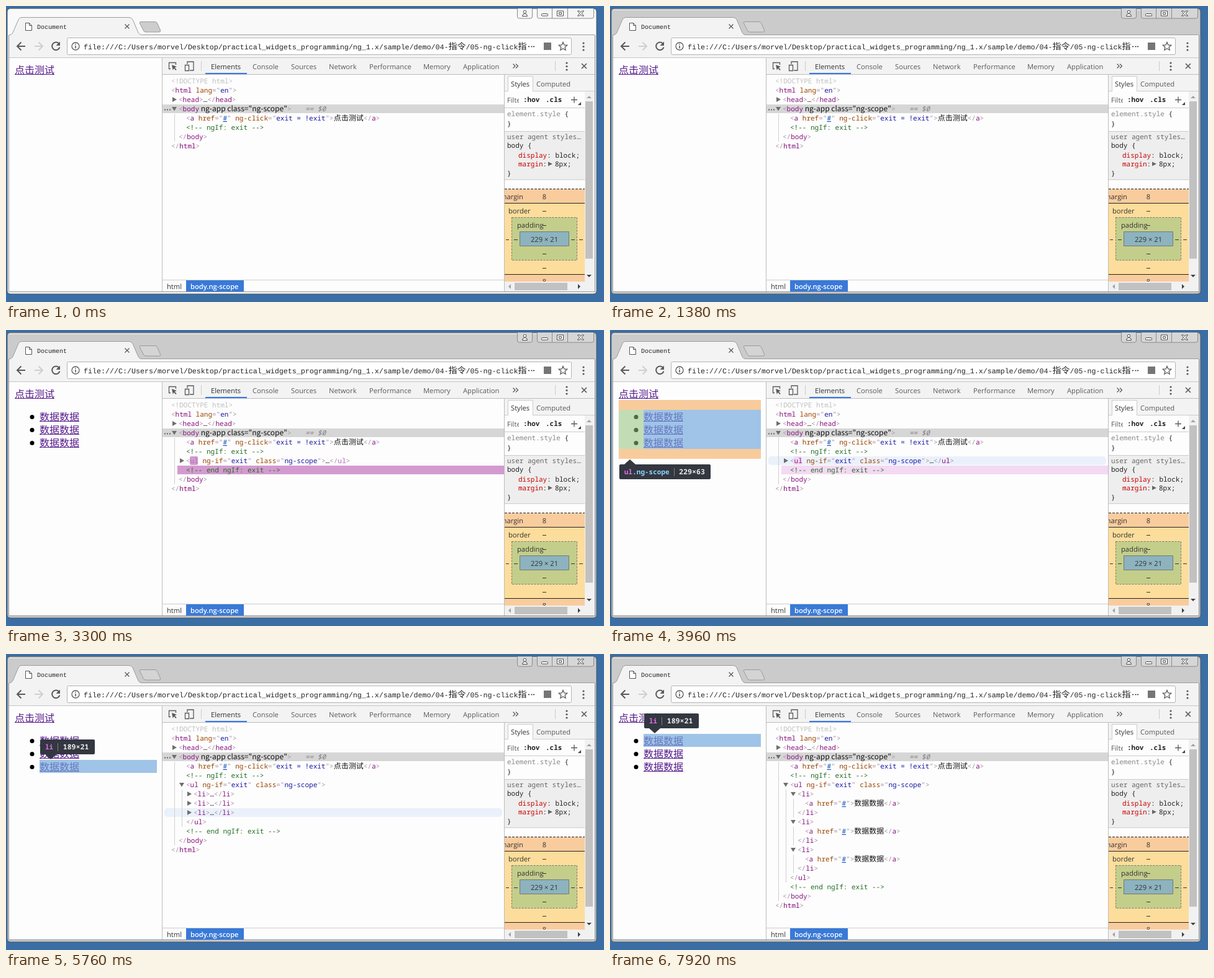
These frames come from a looping animation (963 by 478 pixels, 8 s). An HTML page:

```html
<!DOCTYPE html>
<html lang="en">
<head>
<meta charset="utf-8">
<title>Inspector demo</title>
<style>
  html, body { margin: 0; width: 100%; height: 100%; overflow: hidden; background: #3a6ea5; }
  svg { display: block; text-rendering: geometricPrecision; }
  text { white-space: pre; }
  .ui { font: 11.2px "Open Sans", "Noto Sans", sans-serif; fill: #5a5a5a; }
  .code { font: 11px "Noto Sans Mono", "DejaVu Sans Mono", monospace; fill: #222; }
  .cjk { font-family: "Noto Sans CJK SC", "Noto Sans CJK JP", "Noto Sans CJK", sans-serif; }
  .page { font-size: 16px; }
  .code .cjk { font-size: 12px; fill: #111; }
  .url { font: 11.667px "Liberation Mono", monospace; fill: #222; }
  .url .cjk { font-size: 14px; }
  .dark { fill: #333; }
  .mid { text-anchor: middle; }
  .tag { fill: #881280; }
  .br { fill: #a894a6; }
  .attr { fill: #994500; }
  .val { fill: #1a1aa6; }
  .link { fill: #1155bb; text-decoration: underline; }
  .note { fill: #236e25; }
  .doc { fill: #c0c0c0; }
  .prop { fill: #c80000; }
  .line { fill: none; stroke: #5a5a5a; stroke-width: 1.3; }
</style>
</head>
<body>
<svg width="963" height="478" viewBox="0 0 963 478">
  <defs>
    <clipPath id="side"><path d="M803 111H932V445H803Z"/></clipPath>
    <clipPath id="filter"><path d="M803 140H826V163H803Z"/></clipPath>
  </defs>
  <rect width="963" height="478" fill="#3a6ea5"/>

  <!-- window frame -->
  <rect id="frame" x="2" y="4" width="949" height="461" rx="5" stroke="#50565c"/>
  <path d="M5 6.5H947" stroke="#fff" opacity=".6"/>
  <g id="buttons" stroke="#8a8a8a">
    <path d="M823.5 4V17q0 3 3 3H844.500q3 0 3-3V4"/>
    <path d="M855.500 4V17q0 3 3 3H943.500q3 0 3-3V4M879.500 4V20M904.500 4V20"/>
  </g>
  <g fill="#fff" stroke="#4c4c4c">
    <circle cx="835.500" cy="9.500" r="2.300"/>
    <path d="M831.500 16.500q0-4 4-4t4 4z"/>
    <rect x="862.500" y="12.500" width="10" height="3.500" rx="1"/>
    <path d="M887.500 8H897.500V16H887.500ZM890.500 10.500H894.500V13.500H890.500Z"/>
    <path d="M920.500 8h3l2 2.500 2-2.500h3l-3.300 4 3.300 4h-3l-2-2.500-2 2.500h-3l3.300-4z"/>
  </g>
  <path id="newTab" d="M217 25.500H240q3 0 4 3L248.500 39q1 3-2 3H225q-3 0-4-3L215.500 28q-1-2.500 1.500-2.500Z" stroke="#9a9a9a"/>

  <!-- tab and toolbar -->
  <path d="M5 83V47q4 0 6-4L20 22q2-3.500 5-3.500H198q4 0 6 3.500L213 43q2 4 6 4H948V83Z" fill="#f3f3f3"/>
  <path d="M4.500 47q4.500 0 6.500-4L20 22q2-3.500 5-3.500H198q4 0 6 3.500L213 43q2 4 6 3.500H948" fill="none" stroke="#9c9c9c"/>
  <path d="M31.500 27.500H37.500L41.500 31.500V39.500H31.500ZM37.500 27.500V31.500H41.500" fill="#fff" stroke="#555"/>
  <text x="50" y="37" class="url" style="font-size:10px">Document</text>
  <path d="M191.500 29.500l7 7m0-7l-7 7" class="line" stroke-width="1.600"/>
  <path d="M31 65H18.500M24.500 58.500L18 65l6.500 6.500" class="line" style="stroke-width:2"/>
  <path d="M46 65H58.500M52.500 58.500L59 65l-6.500 6.500" class="line" style="stroke:#cfcfcf;stroke-width:2"/>
  <path d="M85.500 61A6.300 6.300 0 1 0 86.500 66.500" class="line" style="stroke-width:2"/>
  <path d="M87 57.500V64H80.500Z" fill="#5a5a5a"/>
  <rect x="98.500" y="51.500" width="812" height="27" rx="2" fill="#fff" stroke="#b4b4b4"/>
  <circle cx="112" cy="65" r="6" class="line"/>
  <path d="M112 64V68.500M112 61V62.500" class="line" style="stroke-width:1.600"/>
  <text x="125" y="70" class="url">file:///C:/Users/morvel/Desktop/practical_widgets_programming/ng_1.x/sample/demo/04-<tspan class="cjk">指令</tspan>/05-ng-click<tspan class="cjk">指</tspan></text>
  <path d="M841 65.500h2m2.500 0h2m1.500 0h2" stroke="#222" stroke-width="1.600"/>
  <rect x="866" y="59" width="12" height="12" fill="#757575"/>
  <path d="M897 58.500l1.900 4.400 4.800.4-3.600 3.200 1.100 4.700-4.200-2.500-4.200 2.500 1.100-4.700-3.600-3.200 4.800-.4z" class="line"/>
  <g id="dots" fill="#5a5a5a"><circle cx="930" cy="60" r="1.600"/><circle cx="930" cy="65.500" r="1.600"/><circle cx="930" cy="71" r="1.600"/></g>

  <!-- content areas -->
  <path d="M5 83H948V461H5Z" fill="#fdfdfd"/>
  <path d="M5 83.500H948" stroke="#c6c6c6"/>
  <path d="M4.500 47V461.500H948.500V47" fill="none" stroke="#8d9298"/>
  <path d="M252 84H948V110H252Z" fill="#f3f3f3"/>
  <path d="M252 110.500H948M251.500 84V461M802.500 111V461" stroke="#bcbcbc"/>

  <!-- inspector tabs -->
  <path d="M265 101.500H262.500V91.500H273.500V95" class="line"/>
  <path d="M267 95l8 3-3.300 1.500 3 3.200-1.300 1.200-3-3.200-1.600 3z" fill="#5a5a5a"/>
  <path d="M292 94V90H302V104H296M288.500 95.500H294.500V104.500H288.500Z" class="line"/>
  <path d="M314.500 89V105M884.500 89V105" stroke="#ccc"/>
  <g class="ui" id="tabs"></g>
  <path d="M321 108H388V110H321Z" fill="#3b78e7"/>
  <path d="M816.500 93.500l3.500 3.500-3.500 3.500m4.500-7l3.500 3.500-3.500 3.500M925.500 121l3 3-3 3m4-6l3 3-3 3" class="line"/>
  <use href="#dots" x="-27" y="32"/>
  <path d="M927 93l8 8m0-8l-8 8" class="line" style="stroke-width:1.700"/>

  <!-- breadcrumbs -->
  <path d="M252 442.500H802" stroke="#ccc"/>
  <path d="M290 443H383V461H290Z" fill="#3879d9"/>
  <text x="259" y="457" class="ui dark">html</text>
  <text x="297" y="457" class="ui" style="fill:#fff;font-weight:600">body.ng-scope</text>

  <!-- styles pane -->
  <path d="M803 111H948V137H803Z" fill="#f3f3f3"/>
  <path d="M803 137.500H948M803 164.500H932M803 202.500H932" stroke="#ccc"/>
  <path d="M808.500 138V113.500H848.500V138" fill="#fff" stroke="#ccc"/>
  <path d="M803 203H932V281H803Z" fill="#eee"/>
  <path d="M803 280.500H932" stroke="#ccc"/>
  <g class="ui">
    <text x="813" y="130" class="dark">Styles</text><text x="854" y="130">Computed</text>
    <text x="807" y="156" clip-path="url(#filter)">Filter</text>
  </g>
  <g class="code">
    <text x="833" y="155" font-weight="600">:hov</text><text x="869" y="155" font-weight="600">.cls</text>
    <text x="807" y="178"><tspan fill="#888">element.style</tspan> {</text><text x="807" y="194">}</text>
    <text x="807" y="215" fill="#666" style="fill:#666">user agent styles…</text><text x="807" y="229">body {</text>
    <text x="825" y="245"><tspan class="prop">display</tspan>: block;</text>
    <text x="825" y="259"><tspan class="prop">margin</tspan>:</text><text x="884" y="259">8px;</text>
    <text x="807" y="274">}</text>
  </g>
  <path d="M873 251.500l7 3.500-7 3.500z" fill="#666"/>
  <path d="M910 151.500h10m-5-5v10" class="line"/>
  <path d="M926 155v5h-5z" fill="#444"/>

  <!-- box model -->
  <g clip-path="url(#side)">
    <path d="M803 296H932V446H803Z" fill="#f9cc9d"/>
    <path d="M803 319H932V433H803Z" fill="#fddd9b"/>
    <path d="M803 295.500H932" stroke="#222" stroke-dasharray="4 2"/>
    <path d="M803 318.500H932M803 433.500H932" stroke="#222"/>
    <path d="M814.500 341.500H919.500V410.500H814.500Z" fill="#c3ce8b" stroke="#777" stroke-dasharray="3 2"/>
    <path d="M827.500 364.500H906.500V387.500H827.500Z" fill="#8cb3be" stroke="#777"/>
    <path id="dashes" d="M864 331.500h6m-6 23h6m-6 46h6m-6 23h6M805 377.500h5m8 0h6m86 0h6m7 0h6" stroke="#333"/>
    <g class="ui">
      <text x="833" y="312" text-anchor="end" class="dark">margin</text><text x="867" y="312" class="dark mid">8</text>
      <text x="809" y="335" class="dark">border</text><text x="823" y="358" class="dark">padding</text>
      <text x="867" y="381" class="dark mid">229 × 21</text><text x="867" y="449" class="dark mid">8</text>
    </g>
  </g>
  <path d="M932 138H948V461H803V445H932Z" fill="#f1f1f1"/>
  <path d="M933 154H945V408H933ZM819 447H904V459H819Z" fill="#c1c1c1"/>
  <path d="M935 149l4-4 4 4zM813 449v8l-4-4z" fill="#a3a3a3"/>
  <path d="M935 434l4 4 4-4zM921 449v8l4-4z" fill="#404040"/>

  <path d="M252 159H802V173H252Z" fill="#d6d6d6"/>
  <path d="M255 167.500h2m2 0h2m2 0h2" stroke="#666" stroke-width="2"/>
  <text x="482" y="170" class="code" style="fill:#7c7c7c;font-style:italic">== $0</text>
  <g id="tree"></g>
  <g id="page"></g>
</svg>
<script>
const LOOP = 8000, ROW = 15;
const $ = id => document.getElementById(id);
const clamp = v => Math.max(0, Math.min(1, v));
const mix = (a, b, p) => `rgb(${a.map((v, i) => Math.round(v + (b[i] - v) * p))})`;
const grey = (a, b, p) => mix([a, a, a], [b, b, b], p);
const rect = (x, y, w, h, fill, more = '') =>
  `<rect x="${x}" y="${y}" width="${w}" height="${h}" fill="${fill}" ${more}/>`;
const esc = s => s.replace(/</g, '&lt;').replace(/>/g, '&gt;');
const span = (cls, s, more = '') => `<tspan class="${cls}" ${more}>${esc(s)}</tspan>`;

const tabNames = { Elements: 330, Console: 397, Sources: 459, Network: 520, Performance: 585, Memory: 672, Application: 736 };
$('tabs').innerHTML = Object.entries(tabNames).map(([s, x]) =>
  `<text id="${s}" x="${x}" y="102"${s === 'Elements' ? ' class="dark"' : ''}>${s}</text>`).join('');

// start time, inspected node (0 = ul, 1-3 = li), hovered row
const hovers = [
  [0, null, null], [3960, 0, 6], [5160, 0, null], [5520, 1, 7], [5640, 2, 8], [5760, 3, 9],
  [5880, 0, 10], [5940, 3, 9], [6060, 2, 8], [6480, 3, null], [7260, 2, null], [7320, 1, null]
];

// cubic-bezier(0, 0, .2, 1)
function easeOut(x) {
  let lo = 0, hi = 1;
  for (let i = 0; i < 20; i++) {
    const s = (lo + hi) / 2;
    if (.6 * (1 - s) * s * s + s ** 3 < x) lo = s; else hi = s;
  }
  return 3 * (1 - lo) * lo * lo + lo ** 3;
}

function paint(src, tagFill) {
  const token = /(<!--.*?-->)|(<!D.*?>)|(<\/?)(\w+)|( [\w-]+)(=")([^"]*)(")|(>)|([^<>]+)/g;
  return src.replace(token, (m, note, doc, open, tag, attr, eq, val, quote, close) => {
    if (note) return span('note', note);
    if (doc) return span('doc', doc);
    if (open) return span('br', open) + span('tag', tag, tagFill ? `style="fill:${tagFill}"` : '');
    if (attr) return span('attr', attr) + span('br', eq) + span(val === '#' ? 'link' : 'val', val) + span('br', quote);
    if (close) return span('br', close);
    return m === '…' ? m : span('cjk', m);
  });
}

// each row: depth, source, arrow
function treeRows(s) {
  const rows = [
    [0, '<!DOCTYPE html>'], [0, '<html lang="en">'], [1, '<head>…</head>', 'shut'],
    [1, '<body ng-app class="ng-scope">', 'open'],
    [2, '<a href="#" ng-click="exit = !exit">点击测试</a>'], [2, '<!-- ngIf: exit -->']
  ];
  const ul = '<ul ng-if="exit" class="ng-scope">';
  if (s.list && !s.ul) rows.push([2, ul + '…</ul>', 'shut']);
  if (s.ul) {
    rows.push([2, ul, 'open']);
    for (const li of s.items) {
      if (!li) rows.push([3, '<li>…</li>', 'shut']);
      else rows.push([3, '<li>', 'open']);
      if (li === 2) rows.push([4, '<a href="#">数据数据</a>'], [3, '</li>']);
    }
    rows.push([2, '</ul>']);
  }
  if (s.list) rows.push([2, '<!-- end ngIf: exit -->']);
  return rows.concat([[1, '</body>'], [0, '</html>']]);
}

function drawTree(s, row, t) {
  const rows = treeRows(s), top = i => 114 + ROW * i;
  let out = row === null ? '' : rect(255, top(row), 544, 14, '#ebf1fb', 'rx="5"');
  let tagFill = '';
  if (t >= 3000 && t < 4260) {
    const p = easeOut(clamp((t - 3000) / 1120));
    const flash = mix([158, 54, 153], [245, 219, 244], p);
    const fade = `opacity="${1 - clamp((t - 4120) / 140)}"`;
    out += rect(296, top(6), 13, 14, flash, 'rx="2" ' + fade) + rect(276, top(7), 526, 14, flash, fade);
    tagFill = mix([255, 255, 255], [136, 18, 128], p);
  }
  rows.forEach(([depth, src, arrow], i) => {
    const x = 266 + 12 * depth, y = top(i);
    if (arrow === 'shut') out += `<path d="M${x - 10} ${y + 3}l7 4-7 4z" fill="#6e6e6e"/>`;
    if (arrow === 'open') {
      out += `<path d="M${x - 11} ${y + 4}h8l-4 6.500z" fill="#6e6e6e"/>`;
      const end = rows.findIndex((r, j) => j > i && r[0] === depth && r[1].startsWith('</'));
      const next = rows.findIndex((r, j) => j > i && r[0] <= depth);
      if (end > 0 && end === next) out += rect(x - 7, y + ROW, 1, (end - i) * ROW, '#d0d0d0');
    }
    out += `<text x="${x}" y="${y + 11}" class="code">${paint(src, i === 6 ? tagFill : '')}</text>`;
  });
  return out;
}

const pageLink = (x, y, s, fill) =>
  `<text x="${x}" y="${y}" class="cjk page" fill="${fill}">${s}</text>` + rect(x, y + 1, 64, 1, fill);

function tip(x, y, w, arrow, tag, cls, size) {
  const bar = x + 8 + 6.6 * (tag.length + cls.length) + 7;
  const text = (tx, s, fill, more = '') =>
    `<text x="${tx}" y="${y + 16}" class="code" style="fill:${fill};font-weight:600;${more}">${s}</text>`;
  return rect(x, y, w, 24, '#333740', 'rx="2"') + `<path d="${arrow}" fill="#333740"/>` +
    text(x + 8, tag, '#e36eec') + text(x + 8 + 6.6 * tag.length, cls, '#8ed3fb') +
    rect(Math.round(bar), y + 6, 1, 13, '#7d8088') + text(bar + 8.5, size, '#e8e8e8', 'font-size:11.6px');
}

function drawPage(s, node, t) {
  const purple = '#551a8b';
  let out = pageLink(14, 109, '点击测试', t >= 2820 && t < 3000 ? '#e00' : purple);
  if (!s.list) return out;
  for (let i = 0; i < 3; i++) {
    const y = 146 + 21 * i;
    out += `<circle cx="42" cy="${y - 5.5}" r="3.500"/>` + pageLink(54, y, '数据数据', purple);
  }
  const blue = 'rgba(111,168,220,.66)', orange = 'rgba(246,178,107,.66)';
  if (node === 0) {
    out += rect(14, 113, 229, 16, orange) + rect(14, 192, 229, 16, orange) +
      rect(14, 129, 40, 63, 'rgba(147,196,125,.55)') + rect(54, 129, 189, 63, blue) +
      tip(15, 217, 147, 'M23 217l9-8 9 8z', 'ul', '.ng-scope', '229×63');
  } else if (node) {
    const y = 108 + 21 * node;
    out += rect(54, y, 189, 21, blue) +
      tip(55, y - 33, 88, `M63 ${y - 9}l9 8 9-8z`, 'li', '', '189×21');
  }
  return out;
}

function drawFrame(t) {
  const active = t < 900 ? 0 : clamp((Math.floor((t - 900) / 60) + 1) / 9);
  $('frame').setAttribute('fill', grey(249, 203, active));
  $('buttons').setAttribute('fill', grey(246, 214, active));
  $('newTab').setAttribute('fill', grey(205, 212, active));
  $('Sources').style.fill = t >= 240 && t < 300 ? '#222' : '';
}

let last = '';
function tick(now) {
  const t = now % LOOP;
  const [, node, row] = hovers.findLast(h => t >= h[0]);
  const state = {
    list: t >= 3000,
    ul: t >= 5160,
    items: [t >= 7920 ? 2 : 0, t >= 7260 ? 2 : 0, t >= 6540 ? 2 : t >= 6480 ? 1 : 0]
  };
  drawFrame(t);
  const flashing = t >= 2820 && t < 4400 ? Math.floor(t / 20) : 0;
  const key = JSON.stringify([state, node, row, flashing]);
  if (key !== last) {
    last = key;
    $('tree').innerHTML = drawTree(state, row, t);
    $('page').innerHTML = drawPage(state, node, t);
  }
  requestAnimationFrame(() => tick(performance.now()));
}
tick(performance.now());
</script>
</body>
</html>
```
